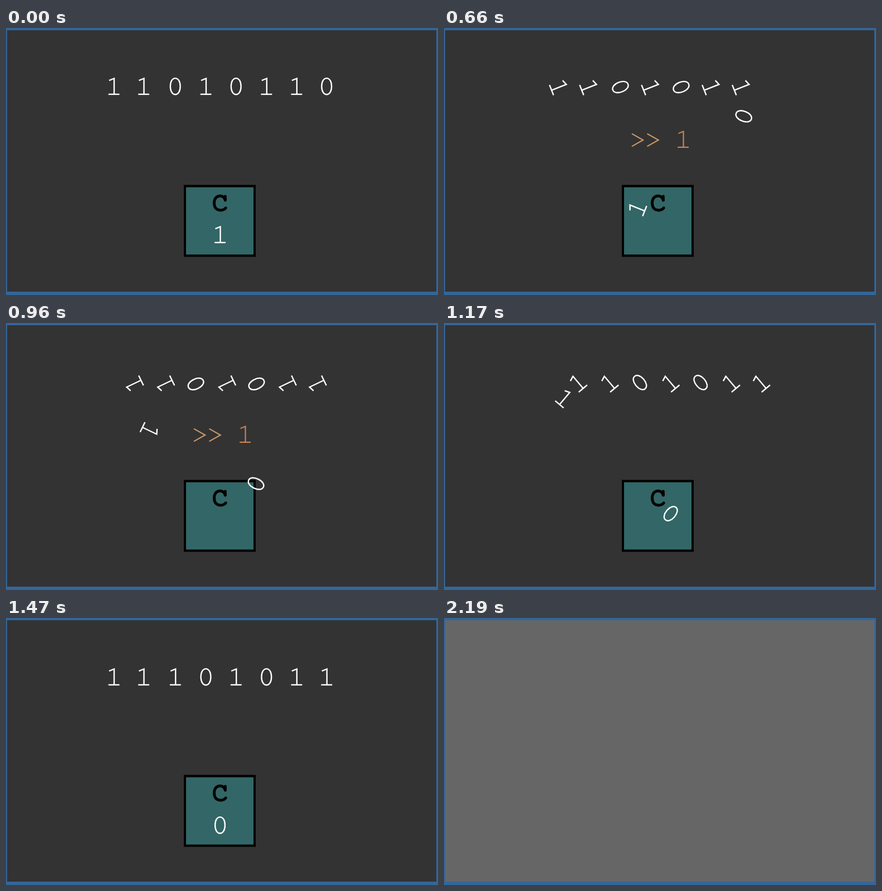
Recreate the animation shown at these times as an HTML page with a canvas. Size 775 by 479 pixels, loop 2280 ms.

```html
<!DOCTYPE html>
<html lang="en">
<head>
<meta charset="utf-8">
<title>Rotate right through carry</title>
<style>
html, body { margin: 0; width: 100%; height: 100%; overflow: hidden; background: #369; }
canvas { display: block; }
</style>
</head>
<body>
<canvas id="stage" width="775" height="479" role="img"
  aria-label="The byte 11010110 is shifted right by one (>> 1) through the carry bit C"></canvas>
<script>
const ctx = document.getElementById('stage').getContext('2d');
const LOOP = 2280, STEP = 30, START = 570, END = 1470, HINT_END = 1110;
const bits = [1, 1, 0, 1, 0, 1, 1, 0];
const slots = [194.5, 248, 304.7, 359.5, 413.7, 468.3, 522.3, 576.2];
const ROW = 107.6;
const CARRY = { x: 385, y: 373.6 };
const lerp = (a, b, p) => a + (b - a) * p;

function rect(color, x, y, w, h) {
  ctx.fillStyle = color;
  ctx.fillRect(x, y, w, h);
}

function line(...pts) {
  ctx.beginPath();
  for (let i = 0; i < pts.length; i += 2) ctx.lineTo(pts[i], pts[i + 1]);
  ctx.stroke();
}

// Glyphs sit slightly off their pivot, so a turn makes them wobble.
function digit(bit, x, y, angle = 0, color = '#fff', weight = 2.4) {
  ctx.save();
  ctx.translate(x, y);
  ctx.rotate(angle);
  ctx.translate(-1, -1.9);
  ctx.strokeStyle = color;
  ctx.lineWidth = weight;
  ctx.lineCap = 'butt';
  ctx.lineJoin = 'miter';
  if (bit) {
    line(-8.5, -10.6, 0.5, -14.2, 0.5, 14.2);
    line(-9.8, 14.2, 10, 14.2);
  } else {
    const rx = 8.9, ry = 14.6, kx = rx * 0.6, ky = ry * 0.58;
    ctx.beginPath();
    ctx.moveTo(0, -ry);
    ctx.bezierCurveTo(kx, -ry, rx, -ky, rx, 0);
    ctx.bezierCurveTo(rx, ky, kx, ry, 0, ry);
    ctx.bezierCurveTo(-kx, ry, -rx, ky, -rx, 0);
    ctx.bezierCurveTo(-rx, -ky, -kx, -ry, 0, -ry);
    ctx.closePath();
    ctx.stroke();
  }
  ctx.restore();
}

function carryBox() {
  rect('#000', 319, 281.5, 129, 129);
  rect('#366', 323, 285.7, 121, 120.7);
  ctx.strokeStyle = '#000';
  ctx.lineWidth = 5;
  ctx.lineCap = ctx.lineJoin = 'round';
  line(393.3, 302, 393.3, 309);
  ctx.beginPath();
  ctx.moveTo(393.3, 308);
  ctx.bezierCurveTo(391, 303, 388, 301.2, 384, 301.2);
  ctx.bezierCurveTo(377.5, 301.2, 373.5, 306.5, 373.5, 314);
  ctx.bezierCurveTo(373.5, 322.5, 378, 327, 385, 327);
  ctx.bezierCurveTo(389, 327, 392, 325.6, 394.2, 322.8);
  ctx.stroke();
}

function hint() {
  ctx.strokeStyle = '#c96';
  ctx.lineWidth = 2.1;
  ctx.lineCap = 'butt';
  ctx.lineJoin = 'miter';
  for (const x of [337, 364.5]) line(x, 189.6, x + 20.2, 201, x, 212.4);
  digit(1, 430, 201.6, 0, '#d0855c', 2.1);
}

function draw(t) {
  rect('#369', 0, 0, 775, 479);
  const back = t < 2100 ? '#333' : t < 2190 ? '#999' : '#666';
  rect(back, 2, 4, 770, 469);
  if (t >= 2100) return;

  const u = Math.min(1, Math.max(0, (t - START) / (END - START)));
  const p = 1 - (1 - u) ** 2;
  const turn = p * Math.PI * 2;
  const lift = t < START ? -1 : 0;

  carryBox();
  if (t > START && t < HINT_END) hint();
  for (let i = 0; i < 7; i++) {
    digit(bits[i], lerp(slots[i], slots[i + 1], p), ROW + lift, turn);
  }
  digit(bits[7], lerp(slots[7], CARRY.x, p), lerp(ROW, CARRY.y, p) + lift, -turn);
  digit(1, lerp(CARRY.x, slots[0], p), lerp(CARRY.y, ROW, p) + lift, -turn);
}

const begin = performance.now();
function frame() {
  const t = (performance.now() - begin) % LOOP;
  draw(Math.floor(t / STEP) * STEP);
  requestAnimationFrame(frame);
}
frame();
</script>
</body>
</html>
```
